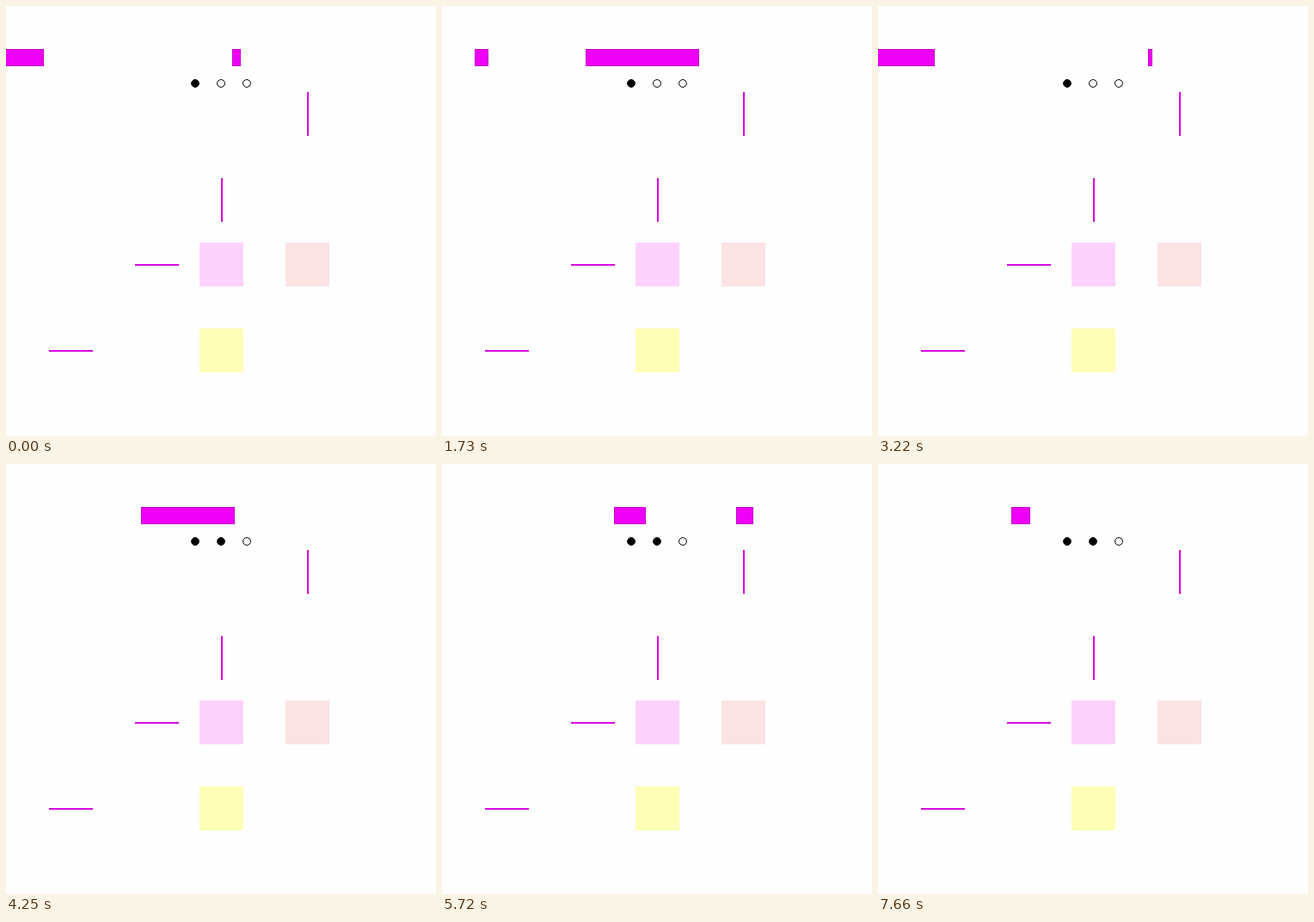
Animation of 500x500 px, one loop 8000 ms. Source, as an HTML page with a canvas:

```html
<!DOCTYPE html>
<html lang="en">
<head>
<meta charset="utf-8">
<title>One-dimensional view</title>
<style>
  html, body { margin: 0; width: 100%; height: 100%; overflow: hidden; background: #fefefe; }
  canvas { display: block; width: 500px; height: 500px; }
</style>
</head>
<body>
<canvas id="stage" width="500" height="500"></canvas>
<script>
const ctx = document.getElementById("stage").getContext("2d");
const LOOP = 8000;
const SIZE = 500;
const CELL = 50;
const PX_PER_DEGREE = SIZE / 90;
const SECOND_DOT_AT = 3440;

// Four walls step down a diagonal: two upright, then two flat
const walls = [0, 1, 2, 3].map(i => {
  const upright = i < 2;
  return {
    x: upright ? 350 - 100 * i : 350 - 100 * i, // wall start
    y: 100 + 100 * i,
    dx: upright ? 0 : CELL,
    dy: upright ? CELL : 0
  };
});

const goals = [
  { x: 225, y: 275, color: "#fbd2fc" },
  { x: 325, y: 275, color: "#fbe3e4" },
  { x: 225, y: 375, color: "#fefeb6" }
];

// The unseen walker: x, y and heading in degrees clockwise from north
const home = [330, 317, 2.84];
const moves = [
  { start: 0, end: 480, pose: [349.3, 262, 1.95] },
  { start: 880, end: 1160, pose: [345.5, 253, -11.7] },
  { start: 1160, end: 2330, pose: [350, 282, -92.4] },
  { start: 2590, end: 3220, pose: [342.5, 300, -9.55] },
  { start: 3220, end: 3600, pose: [350, 300, -10.3] },
  { start: 3890, end: 5090, pose: [291.4, 300, -81.6] },
  { start: 5090, end: 6390, pose: [251, 285.7, -133.65] },
  { start: 6590, end: 6930, pose: [251, 285.7, -127.8] },
  { start: 7060, end: 7660, pose: [250, 306.7, -69.17] }
];

const easeOut = t => 1 - (1 - t) ** 1.5;
const clamp01 = t => Math.min(1, Math.max(0, t));

function poseAt(time) {
  return moves.reduce((pose, move) => {
    const part = easeOut(clamp01((time - move.start) / (move.end - move.start)));
    return pose.map((value, i) => value + (move.pose[i] - value) * part);
  }, home);
}

// Angle of a point, relative to the heading, in -180..180
function bearing(px, py, [x, y, heading]) {
  const angle = Math.atan2(px - x, y - py) * 180 / Math.PI - heading;
  return ((angle + 180) % 360 + 360) % 360 - 180;
}

function drawWallInView({ x, y, dx, dy }, pose) {
  const [from, to] = [bearing(x, y, pose), bearing(x + dx, y + dy, pose)].sort((a, b) => a - b);
  const width = to - from;
  if (width < 0.01 || width > 180) return;
  const left = Math.floor(SIZE / 2 + from * PX_PER_DEGREE);
  const right = Math.ceil(SIZE / 2 + to * PX_PER_DEGREE);
  ctx.fillStyle = "#c400cc";
  ctx.fillRect(left, 50, right - left, 20);
  ctx.fillStyle = "#ee00f6";
  ctx.fillRect(left + 1, 51, Math.max(0, right - left - 2), 18);
}

function drawDot(x, filled) {
  ctx.beginPath();
  ctx.arc(x, 90, 4.4, 0, Math.PI * 2);
  ctx.fillStyle = filled ? "#000" : "#fefefe";
  ctx.strokeStyle = "#000";
  ctx.fill();
  ctx.stroke();
}

function drawMap() {
  for (const { x, y, color } of goals) {
    ctx.fillStyle = color;
    ctx.fillRect(x, y, CELL + 1, CELL + 1);
  }
  ctx.fillStyle = "#d800e2";
  for (const { x, y, dx, dy } of walls) {
    ctx.fillRect(x, y, dx ? dx + 1 : 2, dy ? dy + 1 : 2);
  }
}

function draw(time) {
  ctx.fillStyle = "#fefefe";
  ctx.fillRect(0, 0, SIZE, SIZE);
  drawMap();
  const pose = poseAt(time);
  walls.forEach(wall => drawWallInView(wall, pose));
  [true, time >= SECOND_DOT_AT, false].forEach((filled, i) => drawDot(220 + i * 30, filled));
}

const began = performance.now();
function tick() {
  draw((performance.now() - began) % LOOP);
  requestAnimationFrame(tick);
}
tick();
</script>
</body>
</html>
```
